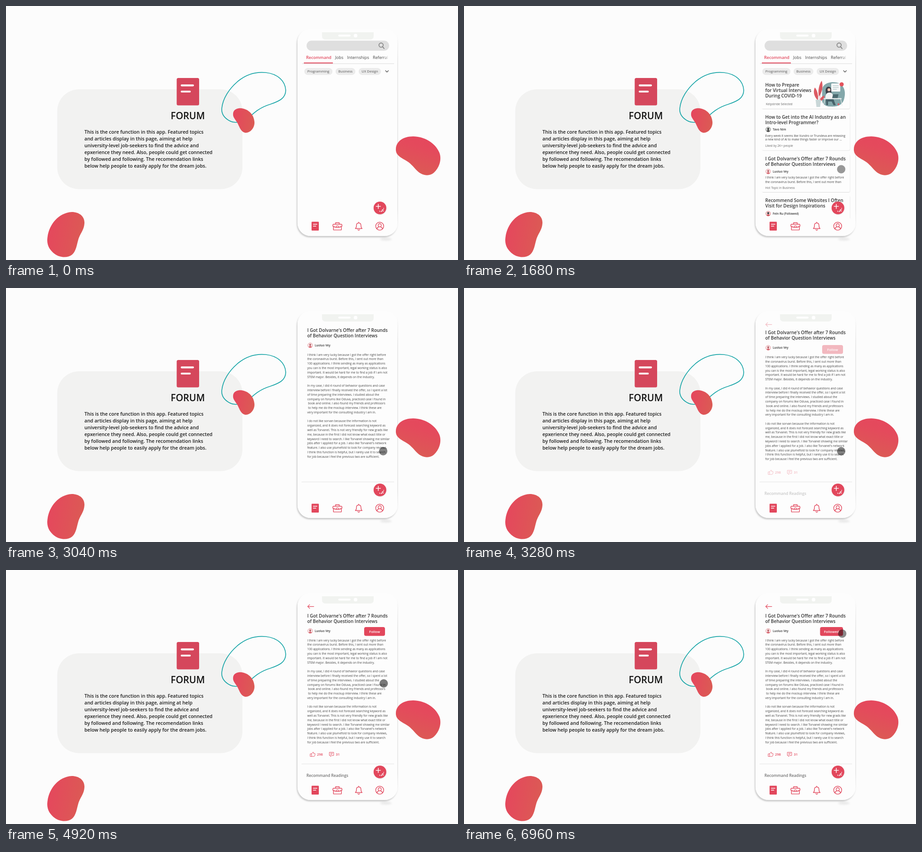
Recreate the animation shown at these times as an HTML page. Size 997 by 561 pixels, loop 7000 ms.

```html
<!DOCTYPE html>
<html lang="en">
<head>
<meta charset="utf-8">
<title>Forum</title>
<style>
html, body { margin: 0; width: 100%; height: 100%; overflow: hidden; background: #fcfcfc; }
svg { display: block; width: 997px; height: 561px; font-family: "Open Sans", sans-serif; }
</style>
</head>
<body>
<svg id="stage" viewBox="0 0 997 561" xmlns="http://www.w3.org/2000/svg"></svg>
<script>
const RED = '#e2475c', INK = '#333', GREY = '#666', BODY = 6.55, LEAD = 9.78;

const text = (x, y, s, size, weight = 400, fill = INK, more = '') =>
  `<text x="${x}" y="${y}" font-size="${size}" font-weight="${weight}" fill="${fill}" ${more}>${s}</text>`;
const lines = (x, y, lead, list, ...style) =>
  list.map((s, i) => s && text(x, +(y + i * lead).toFixed(2), s, ...style)).join('');
const rect = (x, y, w, h, r, fill, more = '') =>
  `<rect x="${x}" y="${y}" width="${w}" height="${h}" rx="${r}" fill="${fill}" ${more}/>`;
const dot = (x, y, r, fill, more = '') => `<circle cx="${x}" cy="${y}" r="${r}" fill="${fill}" ${more}/>`;
const fill = (d, c) => `<path d="${d}" fill="${c}"/>`;
const stroke = (d, c, w = 1.3) =>
  `<path d="${d}" fill="none" stroke="${c}" stroke-width="${w}" stroke-linecap="round" stroke-linejoin="round"/>`;
const group = (id, inner, more = '') => `<g id="${id}" ${more}>${inner}</g>`;

const title = (y, ...list) => lines(664.5, y, 12, list, 10, 600);
const small = (x, y, s) => text(x, y, s, 6.6, 400, GREY);
const frame = (y, h) => rect(657, y, 194, h, 3, '#fdfdfd', 'filter="url(#soft)"');
const avatar = (y, bg, hair, coat) => dot(671, y, 5.3, bg, `stroke="${coat}" stroke-width=".7"`) +
  dot(671, y - 1.2, 2.2, hair) + fill(`M667.3 ${y + 3.6}q3.7 -5 7.4 0q-3.7 3 -7.4 0z`, coat);
const author = (y, name, ...tones) => avatar(y, ...tones) + text(681, y + 2.3, name, BODY, 600);

const story = [
  'I think I am very lucky because I got the offer right before',
  'the coronavirus burst. Before this, I sent out more than',
  '100 applications. I think sending as many as applications',
  'you can is the most important, legal working status is also',
  'important. It would be hard for me to find a job if I am not',
  'STEM major. Besides, it depends on the industry.', '',
  'In my case, I did 4 round of behavior questions and case',
  'interview before I finally received the offer, so I spent a lot',
  'of time preparing the interviews. I studied about the',
  'company on forums like Oduva, practiced case I found in',
  '\u00a0book and online. I also found my friends and professors',
  '\u00a0to help me do the mockup interview. I think these are',
  'very important for the consulting industry I am in.', '',
  'I do not like sorvan because the information is not',
  'organized, and it does not forecast searching keyword as',
  'well as Torvanel. This is not very friendly for new grads like',
  'me, because in the first I did not know what exact title or',
  'keyword I need to search. I like Torvanel showing me similar',
  'jobs after I applied for a job. I also like Torvanel\'s network',
  'feature. I also use plumefold to look for company reviews,',
  'I think this function is helpful, but I rarely use it to search',
  'for job because I feel the previous two are sufficient.'
];

const defs = `<defs>
  <linearGradient id="warm" x1=".7" y1="0" x2=".4" y2="1"><stop offset="0" stop-color="#e5475d"/><stop offset=".3" stop-color="#e44a5c"/><stop offset="1" stop-color="#db5b54"/></linearGradient>
  <linearGradient id="warm2" x1="0" y1=".4" x2="1" y2=".6"><stop offset="0" stop-color="#e5475d"/><stop offset="1" stop-color="#db5b54"/></linearGradient>
  <linearGradient id="fade"><stop offset="0" stop-color="#fdfdfd" stop-opacity="0"/><stop offset="1" stop-color="#fdfdfd"/></linearGradient>
  <linearGradient id="edge" x2="0" y2="1"><stop offset="0" stop-color="#e4e4e4" stop-opacity="0"/><stop offset=".15" stop-color="#e4e4e4"/><stop offset=".9" stop-color="#e4e4e4"/><stop offset="1" stop-color="#e4e4e4" stop-opacity="0"/></linearGradient>
  <filter id="soft" x="-5%" y="-10%" width="110%" height="125%"><feDropShadow dx=".4" dy=".8" stdDeviation=".7" flood-opacity=".16"/></filter>
  <filter id="drop" x="-10%" y="-10%" width="120%" height="120%"><feDropShadow dx="-1.5" dy="3" stdDeviation="1.8" flood-opacity=".2"/></filter>
  <filter id="blur" x="-50%" y="-100%" width="200%" height="300%"><feGaussianBlur stdDeviation="2"/></filter>
  <clipPath id="view"><rect x="652" y="76" width="204" height="393"/></clipPath>
</defs>`;

const backdrop = rect(0, 0, 997, 561, 0, '#fcfcfc') +
  rect(113, 184, 408.5, 220.5, 48, '#f2f2f1') +
  rect(376.5, 159, 49.5, 60.5, 3.5, '#d5475c') +
  stroke('M387.5 175.3H412.5M387.5 189H405.5', '#fff', 4.2) +
  text(401, 249.5, 'FORUM', 20.8, 600, '#111', 'text-anchor="middle"') +
  lines(173, 282.3, 15, [
    'This is the core function in this app. Featured topics',
    'and articles display in this page, aiming at help',
    'university-level job-seekers to find the advice and',
    'epxerience they need. Also, people could get connected',
    'by followed and following. The recomendation links',
    'below help people to easily apply for the dream jobs.'], 10.58, 600, '#1c1c1c') +
  stroke('M476 226C478 205 492 182 513 165C532 150 553 145 573 147C600 150 616 166 617 186C617 203 604 210 583 217C560 224 548 235 536 246C524 256 506 261 492 253C480 246 475 237 476 226Z', '#18a5a7', 1.7) +
  fill('M501 237C502 228 511 225 520 226C535 228 547 240 548 256C549 268 540 280 529 280C517 279 515 265 509 256C504 248 500 245 501 237Z', 'url(#warm2)') +
  fill('M91 517C92 487 113 457 145 455C162 455 174 465 173 480C172 495 164 502 160 514C156 527 155 541 146 549C136 557 119 556 108 548C97 540 91 530 91 517Z', 'url(#warm2)');

const phone = `<ellipse cx="838" cy="515" rx="13" ry="3" fill="#000" opacity=".08" filter="url(#blur)"/>` +
  rect(643, 50.5, 221, 457.5, 29, '#fdfdfd', 'filter="url(#drop)"') +
  rect(863.2, 62, 1.4, 430, .7, 'url(#edge)') +
  fill('M697 58H811V66Q811 74 803 74H705Q697 74 697 66Z', '#f1f3f0') +
  rect(733, 63.3, 27, 4.2, 2.1, '#fff') + dot(771, 65.4, 4, '#fff');

const search = rect(663, 76.5, 182, 22.3, 11.1, '#dfdfdf') +
  dot(827.3, 86.3, 4.7, 'none', 'stroke="#7d7d7d" stroke-width="1.6"') + stroke('M830.7 90L834 94', '#7d7d7d', 1.7);

const chip = (x, w, s) => rect(x, 137, w, 15.3, 7.6, '#ebebeb') +
  text(x + w / 2, 147.3, s, 7.65, 400, '#555', 'text-anchor="middle"');
const tabs = text(662, 116.5, 'Recommand', 9.2, 600, RED) +
  lines(726, 116.5, 0, ['Jobs'], 9.2, 400, '#444') +
  text(752.5, 116.5, 'Internships', 9.2, 400, '#444') + text(809, 116.5, 'Referral', 9.2, 400, '#444') +
  rect(834, 104, 10, 18, 0, 'url(#fade)') + rect(844, 104, 8, 18, 0, '#fdfdfd') +
  rect(653, 126.8, 203, 1.1, 0, '#dedede') + rect(657, 124.8, 64, 2, 0, RED) +
  chip(658, 62, 'Programming') + chip(727, 43.5, 'Business') + chip(778, 49, 'UX Design') +
  stroke('M837.2 142.8L840.3 146L843.4 142.8', '#555', 1.4);

const sketch =
  fill('M790 186C790 172 806 166 822 169C837 172 843 187 839 203C836 219 824 223 808 222C794 222 788 214 790 202Z', '#83a7aa') +
  fill('M780 208C771 199 770 187 774 180C780 188 782 197 780 208ZM783 200C780 188 783 174 789 165C793 178 790 190 783 200ZM785 210C785 204 789 199 795 198C795 205 791 209 785 210Z', '#dc5a62') +
  stroke('M781 211V198M784 211L788 178', '#a84450', .6) +
  fill('M775.5 207H787.5L785.5 223H777.5Z', '#c9d7d8') +
  rect(810, 171, 20, 18, 1.5, '#f7f8f8') + stroke('M814 176H826M814 180H826M814 184H822', '#9db8ba', 1) +
  dot(833, 173, 4.6, '#e2525c') +
  fill('M798 190C796 181 802 176 807 179C812 182 809 189 811 195L799 197Z', '#3c3f48') + dot(805, 185, 3.2, '#f0c3b0') +
  fill('M797 204C797 194 801 191 806 191C812 191 815 197 816 204Z', '#f4f4f4') +
  fill('M814 195H826L824 204H812Z', '#4c6a70') + rect(793, 203.5, 40, 2.2, 1, '#eef1f1') +
  fill('M798 206H815L820 219H815L811 211H803V219H799Z', '#47626a') +
  stroke('M796 206L793 220M831 206L834 220', '#e8ecec', 1.2) + dot(826, 217, 2.2, '#d96068');

const cards = [
  frame(163.5, 63.5) + title(178.2, 'How to Prepare', 'for Virtual Interviews', 'During COVID-19') +
    small(666, 219, 'Kelpstride Selected') + sketch,
  frame(235.5, 83) + title(248.8, 'How to Get into the AI Industry as an', 'Intro-level Programmer?') +
    author(272.7, 'Tavo Nim', '#dfe3e0', '#3b3b3b', '#444') +
    lines(664.5, 288.5, 8.6, ['Every week it seems like Vundro or Trundeva are releasing',
      'a new kind of AI to make things faster or improve our ...'], BODY, 400, '#444') +
    small(664.5, 310.7, 'Liked by 2K+ people'),
  frame(327.5, 83.5) + small(664.5, 403.8, 'Hot Topic in Business'),
  frame(418.5, 84) + title(433.4, 'Recommend Some Websites I Often', 'Visit for Design Inspirations') +
    author(458.6, 'Feln Ru (Followed)', '#f2d9d6', '#33363f', '#d0555f')
];

const article =
  group('head', title(104.6, "I Got Dolvarne's Offer after 7 Rounds", 'of Behavior Question Interviews')) +
  group('by', author(134.6, 'Luoluo Vey', '#fbeeee', '#b9686f', '#d86a74')) +
  group('copy', lines(664.5, 157.7, LEAD, story.slice(0, 2), BODY, 400, '#444') +
    group('rest', lines(664.5, 157.7 + 2 * LEAD, LEAD, story.slice(2), BODY, 400, '#444')));

const extras = stroke('M679 80.6H665.4M669.8 76.4L665.4 80.6L669.8 84.8', RED, 1.2) +
  `<rect id="btn" y="126" height="19.5" rx="4" fill="${RED}"/>` +
  text(813, 138.6, 'Follow', 7.7, 600, '#fff', 'id="label" text-anchor="middle"') +
  stroke('M671.3 406H674V411.8H671.3ZM674 406.3L677 402.2Q679 402 678.4 405.2H681.3Q682.3 405.6 681.8 407L680.6 411.2Q680.2 411.8 679.4 411.8H674', RED, .9) +
  stroke('M713.6 402.6H722.8V409.8H718L715.8 412V409.8H713.6ZM715.8 405H720.6M715.8 407.2H719', RED, .9) +
  text(686, 410, '298', 7.5, 600, RED) + text(727.5, 410, '31', 7.5, 600, RED) +
  text(662.7, 457.3, 'Recommand Readings', 8.65, 600, '#707070');

const nav = rect(674, 476.5, 16, 19.5, 1.3, RED) + stroke('M677.8 482H686M677.8 486.3H683.5', '#fff', 1.4) +
  stroke('M723 482H739Q741 482 741 484V486.5Q736 489 731 489Q726 489 721 486.5V484Q721 482 723 482ZM722.3 488V494.6H739.7V488M727 482V478.5H735V482', RED, 1.4) +
  rect(729, 485.5, 4, 3.6, .6, '#fdfdfd', `stroke="${RED}" stroke-width="1.2"`) +
  stroke('M770.5 491.5Q773 489.5 773 485Q773 479.3 778 479.3Q783 479.3 783 485Q783 489.5 785.5 491.5ZM776 493.8Q778 496.6 780 493.8M778 477.3V479', RED, 1.4) +
  dot(824.3, 486.3, 8.8, 'none', `stroke="${RED}" stroke-width="1.4"`) +
  dot(824.3, 484.2, 3.5, 'none', `stroke="${RED}" stroke-width="1.4"`) +
  stroke('M818.3 492.4Q819 488.6 822.4 487.7M830.3 492.4Q829.6 488.6 826.2 487.7', RED, 1.4);

const add = dot(824.8, 446, 14, RED, 'filter="url(#soft)"') +
  stroke('M816.4 442.6H826M821.2 437.8V447.4', '#fff', 1.5) +
  stroke('M827.5 454Q830 453.8 829.6 451.4Q829.8 449.4 832.6 449.4', '#fff', 1.5) +
  dot(824.6, 453.3, 1.1, '#fff') + dot(833, 446.8, .9, '#fff') + dot(832.4, 452.8, 1, '#fff');

const stage = document.getElementById('stage');
stage.innerHTML = defs + backdrop + phone + group('search', search) + group('tabs', tabs) +
  group('page', cards.map((c, i) => group('card' + i, c)).join('') +
    group('article', article) + group('rule', rect(652, 427.8, 204, 1, 0, '#e3e3e3')) +
    group('extras', extras), 'clip-path="url(#view)"') +
  nav + add + dot(0, 0, 9.2, '#000', 'id="cursor"') +
  fill('M860 315C861 299 876 288 898 288C922 288 947 302 956 324C962 340 955 358 944 368C934 377 918 375 907 364C897 354 893 347 880 340C868 333 859 328 860 315Z', 'url(#warm)');

const $ = id => document.getElementById(id);
const ease = p => p < .5 ? 4 * p ** 3 : 1 - (2 - 2 * p) ** 3 / 2;
const span = (t, a, b) => Math.min(1, Math.max(0, (t - a) / (b - a)));
const glide = (t, a, b) => ease(span(t, a, b));
const track = (t, keys) => {
  let v = keys[0][1];
  for (let i = 1; i < keys.length; i++) v += (keys[i][1] - keys[i - 1][1]) * glide(t, keys[i - 1][0], keys[i][0]);
  return v;
};
const shift = (id, y, x = 0) => $(id).setAttribute('transform', `translate(${x.toFixed(2)} ${y.toFixed(2)})`);
const show = (id, o) => $(id).setAttribute('opacity', o.toFixed(3));

function draw(t) {
  // cards rise one after another, then give way to the article
  const rise = i => 320 * (1 - glide(t, 40 + 140 * i, 1020 + 150 * i));
  const leave = 1 - span(t, 2440, 2680);
  cards.forEach((c, i) => { shift('card' + i, rise(i)); show('card' + i, leave); });
  show('tabs', leave);
  show('search', 1 - span(t, 2800, 2960));

  // each part travels past its place by 8 px and settles back
  const settle = 8 * glide(t, 3120, 3400);
  const travel = (from, start) => from - (from + 8) * glide(t, start, 3040) + settle;
  shift('article', rise(2));
  shift('head', travel(236, 2480));
  shift('by', travel(231, 2495));
  shift('copy', travel(223.5, 2529));
  show('rest', span(t, 2520, 2720));
  show('rule', span(t, 2880, 3040));
  show('extras', span(t, 3160, 3480));

  const left = track(t, [[5400, 790], [5720, 783], [5840, 783], [6200, 785.4]]);
  $('btn').setAttribute('x', left);
  $('btn').setAttribute('width', 836 - left);
  $('label').setAttribute('x', track(t, [[5400, 813], [5720, 806.8], [5840, 806.8], [6200, 810.6]]));
  $('label').textContent = t < 5520 ? 'Follow' : 'Followed';

  const go = glide(t, 4560, 5280);
  shift('cursor', 360.5 - 220 * go, 832 + 2.3 * go);
  show('cursor', track(t, [[1480, 0], [1680, .4], [2000, .4], [2240, .48], [5300, .52], [5600, .62], [6040, .62], [6500, .46]]));
}

const LOOP = 7000, STEP = 40, t0 = performance.now();
function tick() {
  const t = (performance.now() - t0) % LOOP;
  draw(t - t % STEP);
  requestAnimationFrame(tick);
}
draw(0);
requestAnimationFrame(tick);
</script>
</body>
</html>
```
